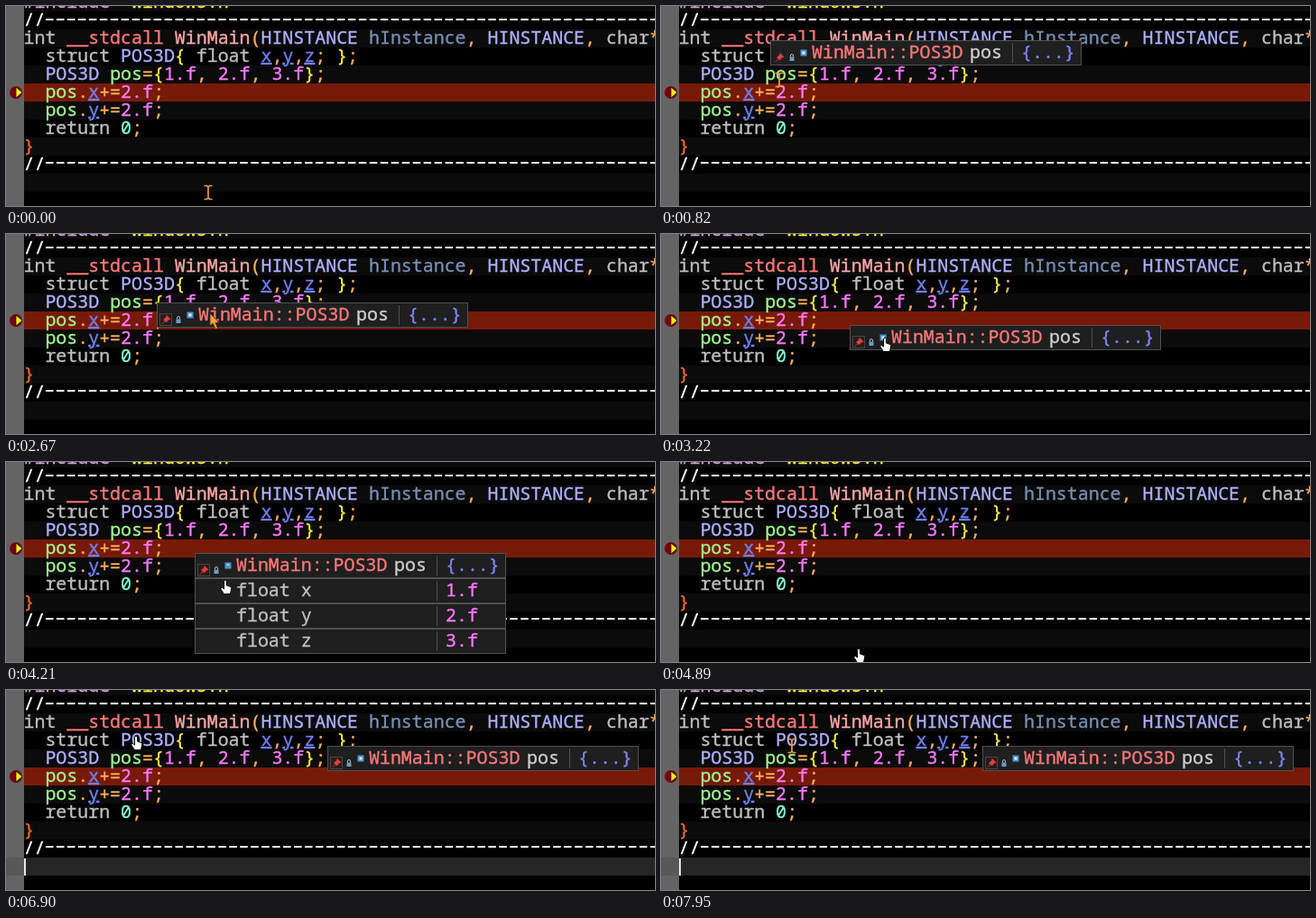
Recreate the animation shown at these times as an HTML page. Size 719x222 px, loop 8 s.

```html
<!DOCTYPE html>
<html lang="en">
<head>
<meta charset="utf-8">
<title>Debugger data tip</title>
<style>
  html, body { margin: 0; width: 100%; height: 100%; overflow: hidden; background: #000; }
  svg { display: block; width: 719px; height: 222px; }
  text { font: 19.93px "Noto Sans Mono", "DejaVu Sans Mono", monospace; white-space: pre; }
  tspan { stroke-width: .35; }
  .u { text-decoration: underline; }
</style>
</head>
<body>
<svg id="stage" viewBox="0 0 719 222" xmlns="http://www.w3.org/2000/svg">
  <g id="rows"></g>
  <g id="currentLine">
    <rect x="20" y="186" width="699" height="20" fill="#262626"/>
    <rect y="186" width="20" height="20" fill="#000" opacity=".12"/>
  </g>
  <g id="code"></g>
  <g fill="none" stroke="#fff" stroke-width="2" stroke-dasharray="8.5 3.46">
    <path d="M44 15H719M44 174H719"/>
  </g>
  <rect id="caret" x="20" y="187" width="2" height="19" fill="#e8e8e8"/>
  <circle cx="11" cy="96" r="7" fill="#780010"/>
  <path d="M11 90L18 96L11 102Z" fill="#ffee20" stroke="#201800" stroke-width=".8"/>

  <g id="tip">
    <rect x=".5" y=".5" width="344" height="27" fill="#1f1f20" stroke="#515154"/>
    <rect id="pinCell" x="3.5" y="12.5" width="13" height="13"/>
    <path d="M11 14.5L15 18.5L13 19L10.5 22L7.5 19L10.5 16.5ZM9 20.5L5.5 24" fill="#e04040" stroke="#e04040" stroke-width=".8"/>
    <rect id="lockCell" x="17.5" y="12.5" width="13" height="13" fill="#30343c" stroke="#a0a8b8"/>
    <path d="M22.5 18.5V17A1.5 1.5 0 0 1 25.5 17V18.5" fill="none" stroke="#b8b8c0"/>
    <rect x="21.5" y="18.5" width="5" height="4.5" fill="#6c9cc4"/>
    <rect x="33.5" y="10.5" width="7" height="7" fill="#4f94c8"/>
    <rect id="bullet" x="35.5" y="12.5" width="3" height="3" fill="#e8f4ff"/>
    <g id="tipText"></g>
    <path d="M268.5 3V25" stroke="#515154"/>
    <g id="members"></g>
  </g>

  <g id="cursor">
    <path id="beam" d="M-4.5 -7.5H-1.5L0 -6L1.5 -7.5H4.5M0 -6V6M-4.5 7.5H-1.5L0 6L1.5 7.5H4.5" fill="none" stroke="#f09a40" stroke-width="1.7"/>
    <path id="arrow" d="M0 0V14L3.2 11.2L6 17.5L8.6 16.4L6 10.4H10Z" fill="#ffa040" stroke="#502000" stroke-width=".8"/>
    <path id="hand" d="M-.5 1Q1 -1 2.5 1V6L7 7.5Q8 8 7.7 10L6.5 15.5H-.5L-4.2 10Q-4.5 8 -2.5 8.5L-.5 10Z" fill="#fff" stroke="#000"/>
  </g>
</svg>
<script>
const LOOP = 8000;
const $ = id => document.getElementById(id);
const show = (id, on) => $(id).setAttribute('visibility', on ? 'inherit' : 'hidden');
const move = (id, x, y) => $(id).setAttribute('transform', `translate(${x} ${y})`);

const ink = {
  k: '#c0c0c0', r: '#ff7878', f: '#ffa8a8', t: '#b0b0ff', b: '#7890b4', m: '#7080f0',
  o: '#ffb058', y: '#fff040', g: '#a0f890', n: '#ff78ff', z: '#80ffd8', e: '#f06828',
  w: '#ffffff', p: '#d0a0e0', v: '#8484ff', d: '#d0d0d0'
};
const esc = s => s.replace(/&/g, '&amp;').replace(/</g, '&lt;');

// Each run is a colour key followed by its text; m is underlined.
function line(x, y, runs) {
  const spans = runs.map(r => {
    const color = ink[r[0]];
    const under = r[0] === 'm' ? ' class="u"' : '';
    return `<tspan fill="${color}" stroke="${color}"${under}>${esc(r.slice(1))}</tspan>`;
  });
  return `<text x="${x}" y="${y}">${spans.join('')}</text>`;
}

const program = [
  ['p#include ', 'y<windows.h>'],
  ['w//'],
  ['kint ', 'r__stdcall ', 'fWinMain', 'o(', 'tHINSTANCE ', 'bhInstance', 'o, ', 'tHINSTANCE', 'o, ', 'kchar', 'o*'],
  ['k  struct ', 'tPOS3D', 'y{ ', 'kfloat ', 'mx', 'o,', 'my', 'o,', 'mz', 'o; ', 'y}', 'o;'],
  ['t  POS3D ', 'gpos', 'o=', 'y{', 'n1.f', 'o, ', 'n2.f', 'o, ', 'n3.f', 'y}', 'o;'],
  ['g  pos', 'o.', 'mx', 'o+=', 'n2.f', 'o;'],
  ['g  pos', 'o.', 'my', 'o+=', 'n2.f', 'o;'],
  ['k  return ', 'z0', 'o;'],
  ['e}'],
  ['w//']
];
$('code').innerHTML = program.map((runs, i) => line(19.5, 2 + i * 20, runs)).join('');

let bands = '';
for (let i = 0; i < 12; i++) {
  const fill = i === 5 ? '#781a08' : i % 2 ? '#000' : '#0b0b0b';
  bands += `<rect x="20" y="${i * 20 - 14}" width="699" height="20" fill="${fill}"/>`;
}
$('rows').innerHTML = bands + '<rect width="20" height="222" fill="#646464"/>';

$('tipText').innerHTML =
  line(46, 20, ['rWinMain::POS3D']) + line(221, 20, ['dpos']) + line(278, 20, ['v{...}']);

$('members').innerHTML = ['x', 'y', 'z'].map((name, i) => {
  const y = 28 * (i + 1);
  return `<rect x=".5" y="${y + .5}" width="344" height="27" fill="#1f1f20" stroke="#515154"/>` +
    `<path d="M268.5 ${y + 3}V${y + 25}" stroke="#515154"/>` +
    line(46, y + 20, ['kfloat ' + name]) + line(278, y + 20, [`n${i + 1}.f`]);
}).join('');

// time, x, y of the pointer's hot spot
const path = [
  [0, 224, 207], [10, 224, 207], [200, 131, 83], [810, 131, 83], [1240, 128, 56],
  [1969, 128, 56], [1970, 142, 54], [2330, 180, 50], [2575, 180, 50], [2670, 226, 88],
  [2770, 268, 113], [3080, 268, 113], [3220, 247, 115], [4120, 247, 115], [4630, 218, 207],
  [4930, 218, 207], [5100, 214, 197], [5440, 214, 197], [5640, 143, 77], [6190, 143, 77],
  [6500, 143, 51], [7889, 143, 51], [7890, 144, 61], [7949, 144, 61], [7950, 145, 62], [LOOP, 145, 62]
];
const shapes = [
  [0, 'beam'], [1060, 'hand'], [2090, 'arrow'], [3160, 'hand'],
  [4930, 'beam'], [6320, 'hand'], [7890, 'beam']
];

function pointer(t) {
  const i = path.findIndex(p => p[0] > t);
  const [t0, x0, y0] = path[i - 1], [t1, x1, y1] = path[i];
  const k = (t - t0) / (t1 - t0);
  return [Math.round(x0 + (x1 - x0) * k), Math.round(y0 + (y1 - y0) * k)];
}

function tipPlace(t, [x, y]) {
  if (t < 220) return null;
  if (t < 2575) return [121, 38];
  if (t < 2780) return [x - 59, y - 12];
  if (t < 4890) return [209, 101];
  if (t < 5670) return null;
  return t < 6900 ? [133, 38] : [356, 62];
}

function draw(t) {
  const at = pointer(t);
  const shape = shapes.filter(s => s[0] <= t).pop()[1];
  move('cursor', ...at);
  for (const id of ['beam', 'arrow', 'hand']) show(id, id === shape);

  const tip = tipPlace(t, at);
  show('tip', tip);
  if (tip) move('tip', ...tip);
  const open = t >= 3420 && t < 4890;
  show('members', open);
  $('bullet').setAttribute('height', open ? 1 : 3);

  const pinned = (t >= 1440 && t < 4890) || t >= 6900;
  const cell = $('pinCell');
  cell.setAttribute('fill', pinned ? '#281c1c' : '#1f1f20');
  cell.setAttribute('stroke', pinned ? '#484446' : '#1f1f20');
  show('lockCell', tip && t >= 1970 && t < 2040);

  show('currentLine', t >= 5400);
  show('caret', (t >= 5400 && t < 6070) || t >= 6500);
}

function tick() {
  draw(performance.now() % LOOP);
  requestAnimationFrame(tick);
}
tick();
</script>
</body>
</html>
```
